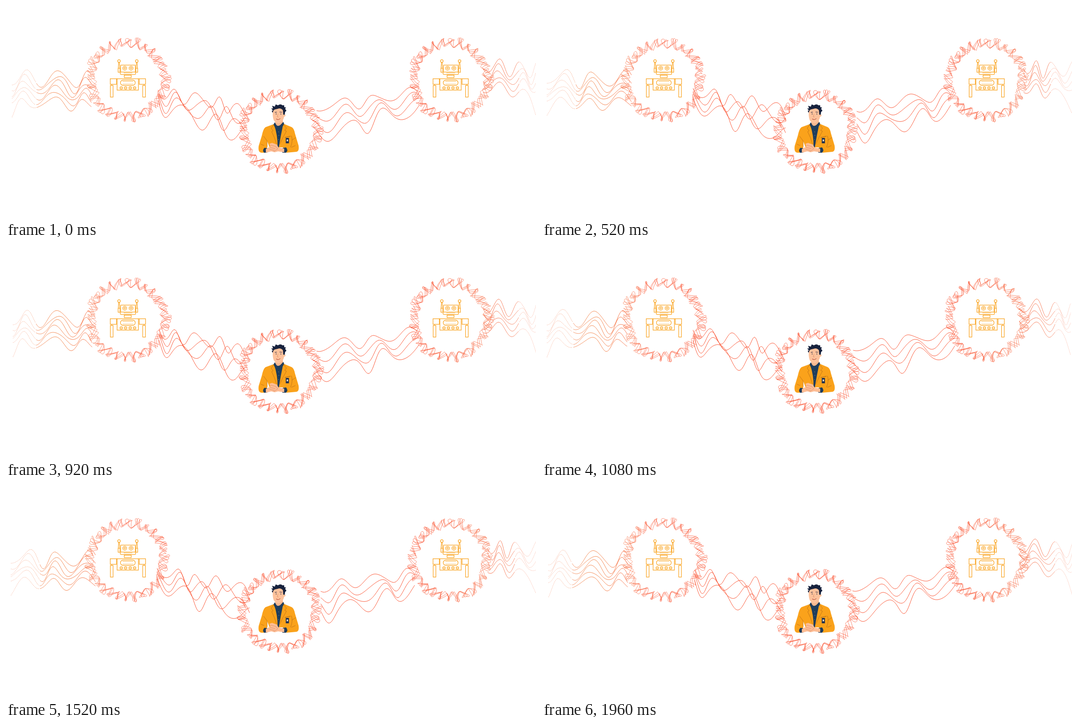
Animation, 1183 px wide and 474 px high, one loop 2000 ms. Source, as an HTML page with a canvas:

```html
<!DOCTYPE html>
<html lang="en">
<head>
<meta charset="utf-8">
<title>Robots and operator</title>
<style>
  html, body { margin: 0; width: 100%; height: 100%; overflow: hidden; background: #fff; }
  canvas, svg { position: absolute; left: 0; top: 0; width: 1183px; height: 474px; }
</style>
</head>
<body>
<canvas id="waves" width="1183" height="474"></canvas>
<svg viewBox="0 0 1183 474">
  <defs>
    <g id="half">
      <circle cx="252.3" cy="123" r="3"/>
      <path d="M251.5 126L250.7 139M253.1 126L254 139M250.3 139h4v9h-4z"/>
      <path d="M232.7 162.5h14v12.5h-14zM233 177.5h6v26h-6zM236 175v2"/>
      <circle cx="265" cy="139" r="4.5"/><circle cx="265" cy="139" r="1.8"/>
      <circle cx="257.2" cy="183.3" r="2.9"/><circle cx="267" cy="183.3" r="2.9"/>
      <path d="M256.2 183.3h2M266 183.3h2"/>
    </g>
    <g id="robot" fill="none" stroke="#f9a21c" stroke-width="1.25">
      <use href="#half"/>
      <use href="#half" transform="translate(544.2) scale(-1 1)"/>
      <rect x="256" y="132" width="32.5" height="15.5" rx="1"/>
      <path d="M256 147.5L254.8 150.5Q255 153 257 153H287.5Q290 153 289.5 150.5L288.5 147.5"/>
      <path d="M263 149.5h19" stroke-dasharray="2 1"/>
      <path d="M264 154.5h15.5v5.5h-15.5zM248 162.5h47.5v25.5h-47.5zM246 162.5h51"/>
      <rect x="255.5" y="165.5" width="33" height="12" rx="6"/>
      <path d="M260 168.5h24M260 174.8h24" stroke-width=".8"/>
    </g>
  </defs>
  <use href="#robot"/>
  <use href="#robot" x="720.5"/>
  <g id="person">
    <path fill="#1f3d5c" d="M599 263L608 260L618 262L617 316H599z"/>
    <path fill="#faa21b" d="M598 264L579 271Q574 275 571 290L564 313Q562 327 570 328H580L583 318V302L588 315H606Q607 290 598 264z"/>
    <path fill="#faa21b" d="M619 263L638 271Q643 274 645 285L653 312Q655 325 648 326L626 328L618 316H609Q613 290 619 263z"/>
    <path fill="#fbb88f" d="M601 252V263Q607 274 618 261V250z"/>
    <path fill="#1f3d5c" d="M600 260L597 265L603 276L607 272zM619 259L621 264L612 277L607 272z"/>
    <path fill="#fdc29c" d="M596 231Q594 248 598 256Q604 265 612 261Q619 257 621 247L622 230Q608 224 596 231z"/>
    <circle cx="621" cy="244.5" r="2.8" fill="#fdc29c"/>
    <path fill="#17223d" d="M595 239L593 234L596 234L592 229L596 229L594 223L600 225L602 220L607 222Q613 218 617 222L621 222L621 226L625 227L623 230L626 234L623 237L622 243L619 243L618 233Q613 227 606 230Q598 231 597 234z"/>
    <g fill="none" stroke="#17223d" stroke-width="1.1" stroke-linecap="round">
      <path d="M600.5 238L604 237.3M611 237L615.5 237.5"/>
      <path d="M603 241v.8M613.5 241v.8" stroke-width="1.5"/>
      <path d="M607 242L605.5 248H608" stroke="#d9875f" stroke-width=".8"/>
      <path d="M603.5 252.5Q608 256 612 251.5" stroke="#b34b3c"/>
    </g>
    <g fill="none" stroke="#b96c16" stroke-width=".8">
      <path d="M598 265L592 273L596 279L593 281Q600 294 604 309M619 264L626 273L622 278L626 280Q617 295 611 309"/>
      <path d="M575 291L583 302V315M637 290Q641 302 635 316M638 300L647 294M569 309L576 312M646 312L637 316"/>
      <path d="M622 294L635 291" stroke="#84501c"/>
    </g>
    <path fill="#1f3d5c" d="M577 317Q571 323 576 328H583V318zM616 318L625 316Q631 323 625 328H617z"/>
    <path fill="#fdbd95" d="M580 320L590 314L588 308L594 306L605 310L608 316L621 319V327L607 325L600 327L592 325L580 328z"/>
    <path fill="none" stroke="#d98a62" stroke-width=".8" d="M590 311L602 314L606 319M589 316L601 319M588 320L599 323M607 319L597 326"/>
    <rect x="624.5" y="295" width="7" height="12" fill="#1f3050"/>
    <rect x="626.5" y="298.5" width="3" height="4" fill="#f5eadb"/>
    <path d="M608.5 281v.8M609 289v.8M608.5 298v.8" stroke="#91aabd" stroke-width="1.5"/>
  </g>
</svg>
<script>
const ctx = document.getElementById('waves').getContext('2d');
const { sin, cos, exp, floor, PI } = Math;
const TAU = PI * 2;
const PERIOD = 1000;
const STEP = 40;
const DOTTED_LEFT = 72;
const DOTTED_RIGHT = 1142;

// Pale at both ends, orange on the way in, red in the middle.
const ink = ctx.createLinearGradient(0, 0, 1183, 0);
[[0, '#f8b09b'], [.1, '#f28347'], [.2, '#fb6546'], [.32, '#fa4e2c'],
 [.78, '#fa4e2c'], [.91, '#f66b43'], [1, '#f9b09b']]
  .forEach(([at, color]) => ink.addColorStop(at, color));

// Strand k starts from the first crest and is lower, later and longer by k times gap, lag and stretch.
const bundles = [
  { from: 12, to: 196, count: 6, y: 161, slope: .03, gap: 11, fan: 0,
    peak: 48, lag: -2, period: 68, stretch: 0, amp: 18, grow: -1, phase: .8 },
  { from: 338, to: 540, count: 4, y: 200, slope: .2, gap: 11, fan: .06,
    peak: 378, lag: 6, period: 47, stretch: 8, amp: 14, grow: 2.5, phase: .8 },
  { from: 698, to: 918, count: 4, y: 220, slope: -.15, gap: 19, fan: -.04,
    peak: 748, lag: 6, period: 75, stretch: 2, amp: 12, grow: 2.5, phase: .45 },
  { from: 1070, to: 1183, count: 5, y: 138, slope: .08, gap: 12, fan: 0,
    peak: 1101, lag: 0, period: 42, stretch: 3, amp: 17, grow: -1, phase: .5 }
];

const rings = [[271, 165], [991.5, 165], [611, 280]];

function trace(points, dash = []) {
  ctx.setLineDash(dash);
  ctx.beginPath();
  points.forEach(([x, y]) => ctx.lineTo(x, y));
  ctx.stroke();
}

function strandHeight(b, k, x) {
  const turn = TAU * (x - b.peak - b.lag * k) / (b.period + b.stretch * k);
  const swell = cos(turn) + .2 * sin(turn * 1.6 + k * 1.7);
  return b.y + b.gap * k + (b.slope + b.fan * k) * (x - b.peak) - (b.amp + b.grow * k) * swell;
}

function drawStrand(b, k, t) {
  const parts = [[], [], []];
  const last = k === b.count - 1;
  for (let x = b.from; x <= b.to; x += 1.5) {
    const angle = TAU * (t - b.phase + (x - b.from) / 150);
    // The lowest strand droops at the outer ends of the stage.
    const droop = last ? 38 * (exp(-x / 18) + exp((x - 1183) / 18)) : 0;
    const point = [x + 5 * cos(angle), strandHeight(b, k, x) + droop + 2 * sin(angle)];
    parts[x < DOTTED_LEFT ? 0 : x < DOTTED_RIGHT ? 1 : 2].push(point);
  }
  ctx.lineWidth = 1;
  parts.forEach((points, i) => trace(points, i === 1 ? [] : [1.5, 1.8]));
}

// Leaning, uneven teeth; the strands spread most at the sides.
function drawRing([cx, cy], t) {
  ctx.lineWidth = .75;
  for (let k = 0; k < 3; k++) {
    const points = [];
    for (let a = 0; a <= TAU; a += .006) {
      const side = cos(a) ** 2;
      const wave = 28 * a + .9 * sin(3 * a + 1) + k * (.7 + .8 * side);
      const height = 9.5 + 2.2 * sin(9 * a + k);
      const r = 83 + height * sin(wave) + 1.5 * sin(14 * a + k);
      const turn = a + (.055 + .02 * sin(7 * a)) * sin(wave + 1 + sin(5 * a + k)) + .02 * sin(2 * wave);
      const angle = TAU * t - 4 * sin(a) + k * .4;
      points.push([
        cx + r * cos(turn) + (1.2 + 2 * side) * cos(angle),
        cy + r * sin(turn) + .7 * sin(angle)
      ]);
    }
    trace(points);
  }
}

function draw(now) {
  const t = floor(now / STEP) * STEP % PERIOD / PERIOD;
  ctx.clearRect(0, 0, 1183, 474);
  ctx.strokeStyle = ink;
  ctx.lineJoin = 'round';
  bundles.forEach(b => {
    for (let k = 0; k < b.count; k++) drawStrand(b, k, t);
  });
  rings.forEach(center => drawRing(center, t));
  requestAnimationFrame(draw);
}

draw(performance.now());
</script>
</body>
</html>
```
